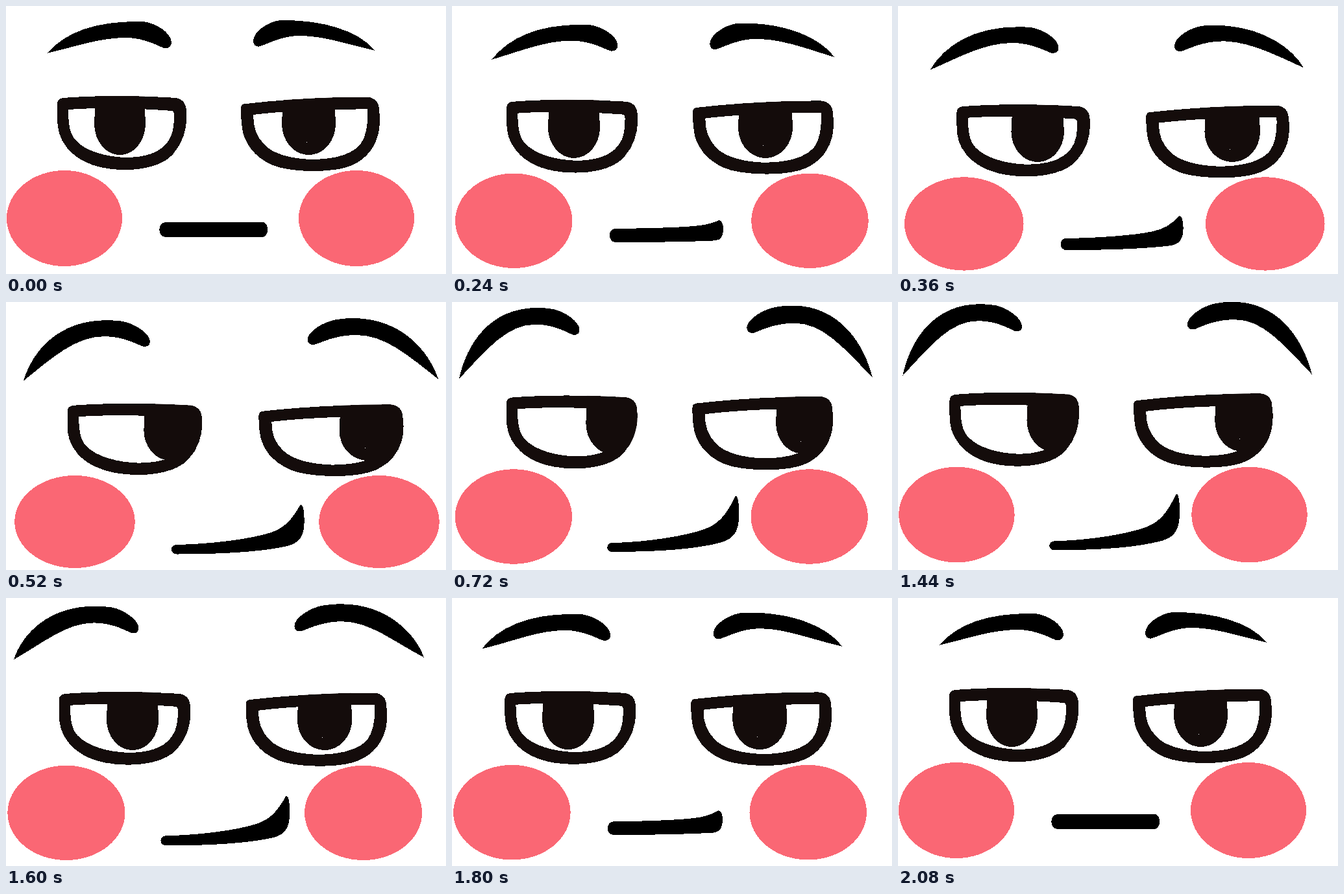
Write an HTML page that moves like this. It is 678 px wide and 414 px high and loops after 2120 ms.

```html
<!DOCTYPE html>
<html lang="en">
<head>
<meta charset="utf-8">
<title>Smirk</title>
<style>
  html, body { margin: 0; width: 100%; height: 100%; overflow: hidden; background: #fff; }
  svg { display: block; width: 678px; height: 414px; shape-rendering: crispEdges; }
  .ink { fill: #140c0b; }
  .hole { fill: #fff; }
  .cheek { fill: #fa6774; }
</style>
</head>
<body>
<svg viewBox="0 0 678 414">
  <defs>
    <path id="rimL" d="M88 142Q165 136 262 142Q278 145 278 164C280 185 274 210 258 228C244 245 215 253 184 253C150 253 115 245 94 219C82 204 79 190 79 172V152Q79 143 88 142Z"/>
    <path id="rimR" d="M370 151Q455 141 556 140.500Q575 142 575 162C577 172 576 190 573 200C566 225 548 242 525 249C500 257 450 257 420 249C390 240 371 219 365 195Q362 180 362 165V158Q362 151 370 151Z"/>
    <clipPath id="clipL"><use href="#rimL"/></clipPath>
    <clipPath id="clipR"><use href="#rimR"/></clipPath>
  </defs>
  <g id="face">
    <ellipse class="cheek" cx="90" cy="328" rx="89" ry="74"/>
    <ellipse class="cheek" cx="540" cy="328" rx="89" ry="74"/>

    <use class="ink" href="#rimL"/>
    <path class="hole" d="M96 160Q165 155 256 162Q259 163 259 168C259 185 258 198 249 210C236 228 212 234 184 234C155 233 123 225 107 207C99 198 96 185 96 160Z"/>
    <g clip-path="url(#clipL)">
      <path id="pupilL" class="ink" d="M-38 136V150L-39.500 182A39.500 48 0 0 0 39.500 182L38 150V136Z"/>
    </g>

    <use class="ink" href="#rimR"/>
    <path class="hole" d="M381 168Q455 159 557 159.500C558 180 556 200 546 214C532 230 505 237 470 237C440 236 411 229 397 213C386 201 381 188 381 168Z"/>
    <g clip-path="url(#clipR)">
      <g id="pupilR">
        <path class="ink" d="M-40 136V150L-41.500 182A41.500 48 0 0 0 41.500 182L40 150V136Z"/>
        <rect class="hole" x="-4" y="210" width="1" height="1"/>
      </g>
    </g>

    <path id="browL"/>
    <path id="browR"/>
    <path id="mouth"/>
  </g>
</svg>
<script>
const STEP = 40, STEPS = 53, RETURN = 34;
const el = id => document.getElementById(id);
const parse = d => d.match(/-?[\d.]+/g).map(Number);

// Each shape is one closed chain of cubic curves: neutral pose, smirking pose.
const shapes = {
  browL: [
    "M63 73C95 38 140 23 212 24C232 27 254 41 255 56C255 63 250 66 244 65C238 64 215 49 185 49C145 49 110 62 63 73",
    "M7 114C20 52 62 -10 150 4C168 8 190 24 190 36C190 43 186 45 180 44C173 42 153 28 123 28C80 28 50 66 7 114"
  ].map(parse),
  browR: [
    "M569 69C543 38 488 21 422 22C402 25 381 40 381 54C381 61 386 64 392 62C402 59 425 46 452 46C490 46 530 60 569 69",
    "M636 112C623 57 580 -16 488 1C468 5 445 21 445 33C445 40 450 42 456 41C465 38 485 26 518 26C560 26 590 62 636 112"
  ].map(parse),
  mouth: [
    "M246 334C290 334 340 334 360 334C375 334 385 334 396 334C400 334 403 339 403 345C403 353 400 357 394 357C350 357 290 357 246 357C233 357 233 334 246 334",
    "M240 369C290 368 350 359 382 347C402 339 413 326 427 297C429 293 433 299 433 322C433 346 429 361 407 368C365 380 300 383 240 383C230 383 230 369 240 369"
  ].map(parse)
};

const ramp = (n, from, to) => Math.min(1, Math.max(0, (n - from) / (to - from)));
const inOut = (u, power) => u < 0.5
  ? Math.pow(2 * u, power) / 2
  : 1 - Math.pow(2 - 2 * u, power) / 2;
const cubic = (n, from, to) => inOut(ramp(n, from, to), 3);
const quad = (n, from, to) => inOut(ramp(n, from, to), 2);

// Rises going into the smirk, falls on the way back to neutral.
const pose = (n, start, end, back, rest) => cubic(n, start, end) - cubic(n, back, rest);

// The pointed end sits at both ends of the chain and may move on its own timing.
function morph(id, amount, tipX = amount, tipY = amount) {
  const [a, b] = shapes[id], last = a.length - 1;
  const v = a.map((x, i) => {
    const atTip = i < 4 || i > last - 4;
    const t = !atTip ? amount : i % 2 ? tipY : tipX;
    return (x + (b[i] - x) * t).toFixed(2);
  });
  el(id).setAttribute("d", `M${v.slice(0, 2)}C${v.slice(2)}Z`);
}

function squash(n) {
  if (n < RETURN) {
    const k = Math.min(0.355 * n * n, 0.311 * Math.max(0, 24.2 - n) ** 2) / 39;
    return [1 + 0.0422 * k, 1 - 0.034 * k, 12.2 * k, 22.6 * k];
  }
  const k = 0.385 * (quad(n, RETURN, 42) - quad(n, 42, 50));
  return [1 + 0.051 * k, 1 - 0.034 * k, 4 * k, 22.6 * k];
}

function draw(ms) {
  const n = Math.floor(ms / STEP) % STEPS;
  const [sx, sy, tx, ty] = squash(n);
  el("face").setAttribute("transform", `matrix(${sx} 0 0 ${sy} ${tx} ${ty})`);

  const look = 64 * pose(n, 1, 18.5, RETURN, 43.8);
  el("pupilL").setAttribute("transform", `translate(${175.5 + look} 0)`);
  el("pupilR").setAttribute("transform", `translate(${466.5 + look} 0)`);

  const lift = pose(n, 0, 20, RETURN, 52);
  const tipX = pose(n, 0, 19, 36, 52), tipY = pose(n, 0, 22, RETURN, 45);
  morph("browL", lift, tipX, tipY);
  morph("browR", lift, tipX, tipY);
  morph("mouth", quad(n, 1.4, 16.8) - cubic(n, RETURN, 52));
}

const start = performance.now();
function tick() {
  draw(performance.now() - start);
  requestAnimationFrame(tick);
}
tick();
</script>
</body>
</html>
```
